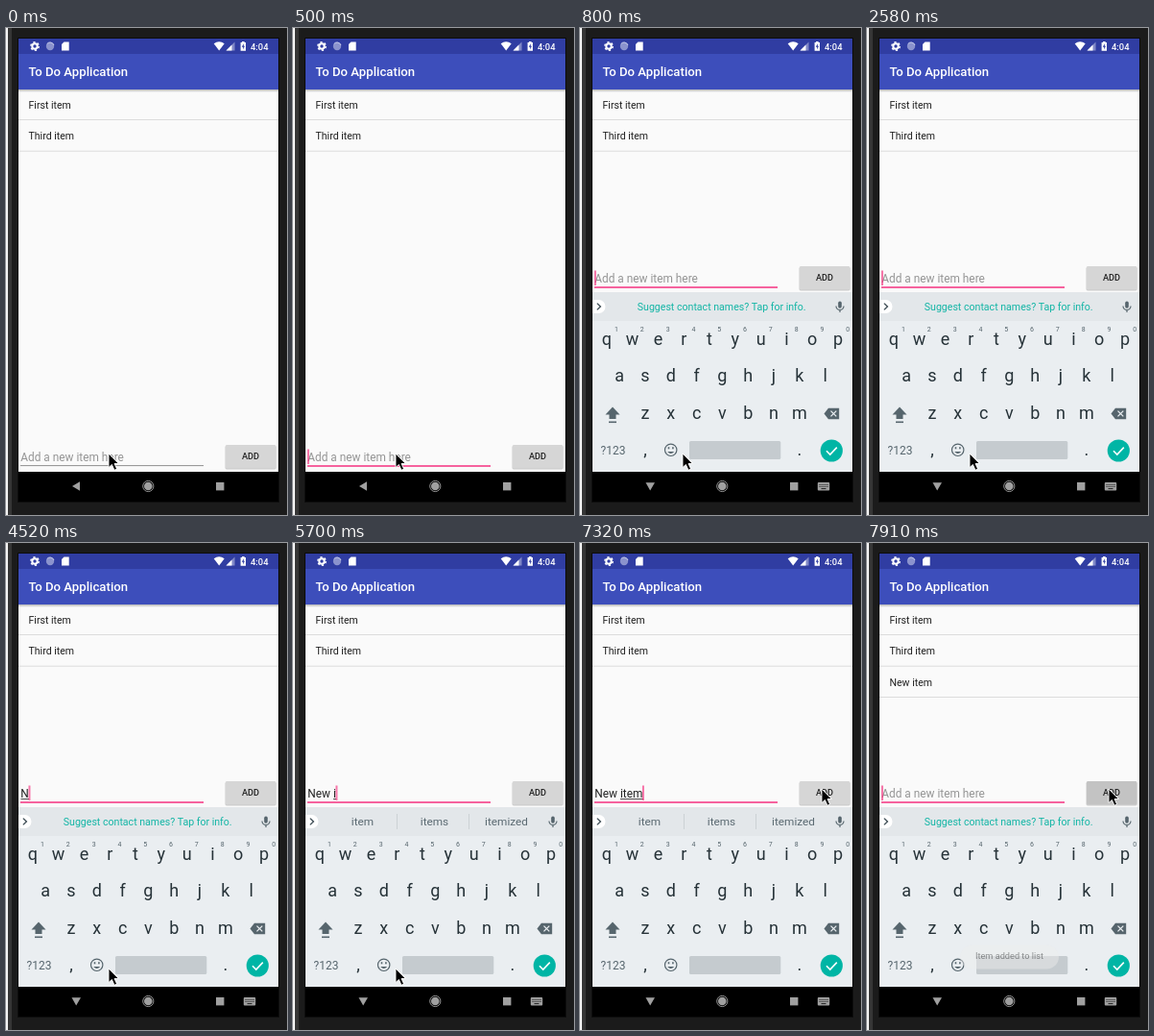
An HTML page that plays this animation: 293x507 px, repeating every 8000 ms.

```html
<!DOCTYPE html>
<html lang="en">
<head>
<meta charset="utf-8">
<title>To Do Application</title>
<style>
html, body { margin: 0; width: 100%; height: 100%; overflow: hidden; background: #1b1b1b; }
svg { display: block; width: 100%; height: 100%; font-family: Roboto, sans-serif; }
.anim { animation: 8s step-end infinite; }
.mid { text-anchor: middle; }
.medium { font-weight: 500; }

#row { animation-name: row; }
@keyframes row { 0% { transform: none; } 8.125%, 100% { transform: translateY(-186px); } }

#idle { animation-name: idle; }
@keyframes idle { 0% { opacity: 1; } 6.25%, 100% { opacity: 0; } }
#focus { animation-name: focus; }
@keyframes focus { 0% { opacity: 0; } 6.25%, 100% { opacity: 1; } }

#hint { animation-name: hint; }
@keyframes hint { 0% { opacity: 1; } 56.5% { opacity: 0; } 97%, 100% { opacity: 1; } }

#typed { animation-name: typed; }
@keyframes typed {
  0% { width: 0; } 56.5% { width: 9px; } 62% { width: 15.3px; } 63.875% { width: 24.3px; }
  67.5% { width: 27px; } 71.25% { width: 30px; } 73.125% { width: 33.9px; }
  75% { width: 40.2px; } 76.625% { width: 51px; } 97%, 100% { width: 0; }
}
#caretX { animation-name: caretX; }
@keyframes caretX {
  0% { transform: none; } 56.5% { transform: translateX(8.5px); } 62% { transform: translateX(14.8px); }
  63.875% { transform: translateX(23.7px); } 67.5% { transform: translateX(26.6px); }
  71.25% { transform: translateX(29.5px); } 73.125% { transform: translateX(33.4px); }
  75% { transform: translateX(39.7px); } 76.625% { transform: translateX(50px); }
  97%, 100% { transform: none; }
}
#caret { animation-name: blink; }
@keyframes blink {
  0% { opacity: 0; } 6.25% { opacity: 1; } 13.75% { opacity: 0; } 19.25% { opacity: 1; }
  24.875% { opacity: 0; } 32.25% { opacity: 1; } 37.875% { opacity: 0; } 43.375% { opacity: 1; }
  50.875% { opacity: 0; } 56.5% { opacity: 1; } 84.125% { opacity: 0; } 89.75%, 100% { opacity: 1; }
}
#firstWord { animation-name: firstWord; }
@keyframes firstWord { 0% { opacity: 1; } 67.5%, 100% { opacity: 0; } }

#press { animation-name: press; }
@keyframes press { 0% { fill: #d6d6d6; } 95.125%, 100% { fill: #c3c3c3; } }
#added { animation-name: added; }
@keyframes added { 0% { opacity: 0; } 97%, 100% { opacity: 1; } }
#toast { animation-name: toast; }
@keyframes toast { 0% { opacity: 0; } 98.875%, 100% { opacity: .45; } }

#keyboard { animation-name: keyboard; }
@keyframes keyboard {
  0% { opacity: 0; transform: none; } 8.125% { opacity: .68; transform: translateY(18px); }
  10%, 100% { opacity: 1; transform: none; }
}
#tip { animation-name: tip; }
@keyframes tip { 0% { opacity: 1; } 67.5% { opacity: 0; } 97%, 100% { opacity: 1; } }
#words { animation-name: words; }
@keyframes words { 0% { opacity: 0; } 71.25% { opacity: 1; } 97%, 100% { opacity: 0; } }

#navBack { animation-name: navBack; }
@keyframes navBack { 0% { opacity: 1; } 8.125%, 100% { opacity: 0; } }
#navHide { animation-name: navHide; }
@keyframes navHide { 0% { opacity: 0; } 8.125%, 100% { opacity: 1; } }

#mouse { animation-name: mouse; }
@keyframes mouse {
  0% { transform: translate(107px, 443px); } 82.25% { transform: translate(115.5px, 438px); }
  84.125% { transform: translate(152px, 404px); } 86% { transform: translate(200px, 345px); }
  87.875% { transform: translate(241px, 286px); } 89.75% { transform: translate(262px, 260px); }
  91.5%, 100% { transform: translate(252px, 256px); }
}
</style>
</head>
<body>
<svg viewBox="0 0 293 507" preserveAspectRatio="none">
  <defs>
    <linearGradient id="shade" x2="0" y2="1">
      <stop stop-color="#000" stop-opacity=".28"/><stop offset="1" stop-color="#000" stop-opacity="0"/>
    </linearGradient>
    <clipPath id="typedClip"><rect id="typed" class="anim" x="15" y="246" width="0" height="220"/></clipPath>
  </defs>

  <!-- device -->
  <rect width="293" height="507" fill="#1b1b1b"/>
  <rect width="2" height="507" fill="#f4f4f4"/>
  <rect x="2" width="4" height="507" fill="#353535"/>
  <rect x="12" y="10" width="273" height="484" fill="#0c0c0c"/>
  <rect x="13" y="11" width="271" height="451" fill="#fafafa"/>
  <rect x="13" y="462" width="271" height="31"/>

  <!-- bars -->
  <rect x="13" y="64" width="271" height="3" fill="url(#shade)"/>
  <rect x="13" y="11" width="271" height="16" fill="#303da2"/>
  <rect x="13" y="27" width="271" height="37" fill="#3d4ebb"/>
  <text class="medium" x="23.5" y="50.3" font-size="13.2" fill="#fff">To Do Application</text>
  <g fill="#fff">
    <circle cx="30" cy="19" r="2.7" fill="none" stroke="#fff" stroke-width="2"/>
    <circle cx="30" cy="19" r="4.2" fill="none" stroke="#fff" stroke-width="1.5" stroke-dasharray="2.2"/>
    <circle cx="46" cy="19" r="4.2" fill="#8b93cd"/>
    <path d="M42.8 16.5A4.2 4.2 0 0 1 50 18" fill="none" stroke="#c5cae9"/>
    <path d="M60.5 14.5H65.7V23.5H58V17Z"/>
    <path d="M216.7 16.2Q222.2 12.5 227.7 16.2L222.2 23.4Z"/>
    <path d="M238.5 14.5V23.5H229.5Z" opacity=".4"/>
    <path d="M235.5 17.5V23.5H229.5Z"/>
    <path d="M246 14H248.6V15H250V23.8H244.6V15H246Z"/>
    <path d="M247.8 16.2L245.8 19.8H247.2V22.5L249 18.8H247.8Z" fill="#303da2"/>
    <text class="medium" x="255" y="22.6" font-size="9.4">4:04</text>
  </g>

  <!-- list -->
  <g font-size="10.55" fill="#212121">
    <text x="23.5" y="83.6">First item</text>
    <text x="23.5" y="116.1">Third item</text>
    <path d="M13 95.5H284M13 128.2H284" stroke="#dcdcdc"/>
    <g id="added" class="anim">
      <text x="23.5" y="148.6">New item</text>
      <path d="M13 160.5H284" stroke="#dcdcdc"/>
    </g>
  </g>

  <!-- entry row -->
  <g id="row" class="anim">
    <text id="hint" class="anim" x="15.3" y="451" font-size="11.86" fill="#959595">Add a new item here</text>
    <path id="idle" class="anim" d="M15 455.6H206" stroke="#858585" stroke-width=".9"/>
    <path id="focus" class="anim" d="M15 456H206" stroke="#f5317f" stroke-width="1.6"/>
    <g clip-path="url(#typedClip)">
      <text x="15.3" y="451" font-size="11.86" fill="#212121">New item</text>
      <path id="firstWord" class="anim" d="M15.5 452.6H39.3" stroke="#333" stroke-width=".9"/>
      <path d="M42 452.6H66" stroke="#333" stroke-width=".9"/>
    </g>
    <g id="caretX" class="anim"><rect id="caret" class="anim" x="15.3" y="438.5" width="1.3" height="15.5" fill="#f5317f"/></g>
    <rect x="228.5" y="434.8" width="53.2" height="24.6" rx="1.6" opacity=".18"/>
    <rect id="press" class="anim" x="229" y="434" width="52.3" height="24.3" rx="1.3" fill="#d6d6d6"/>
    <text class="mid medium" x="255" y="449.2" font-size="9.2" fill="#212121">ADD</text>
  </g>

  <!-- keyboard -->
  <g id="keyboard" class="anim">
    <rect x="13" y="275" width="271" height="187" fill="#eaeef1"/>
    <rect x="13" y="275" width="271" height="30" fill="#e3e7ea"/>
    <path d="M13 283H19.5A7 7 0 0 1 19.5 297H13Z" fill="#fff"/>
    <path d="M17.8 286.6L21.4 290L17.8 293.4" fill="none" stroke="#37474f" stroke-width="1.3"/>
    <text id="tip" class="anim mid" x="147.7" y="293.8" font-size="10.6" fill="#12b5a5">Suggest contact names? Tap for info.</text>
    <g id="words" class="anim mid" font-size="11.8" fill="#5b6a72">
      <text x="72.5" y="294.2">item</text><text x="147.5" y="294.2">items</text><text x="222.5" y="294.2">itemized</text>
      <path d="M108.5 282V298M183.5 282V298" stroke="#ccd2d5"/>
    </g>
    <g fill="none" stroke="#56656d" stroke-width="1.2">
      <rect x="269.2" y="284.5" width="3.6" height="7.2" rx="1.8" fill="#56656d" stroke="none"/>
      <path d="M267 289.5A4 4 0 0 0 275 289.5M271 293.5V296"/>
    </g>
    <g id="keys" class="mid" fill="#263238"></g>
    <path d="M34 394.5L41.5 402.5H37.5V407H30.5V402.5H26.5Z" fill="#56656d"/>
    <path d="M30 410.3H38" stroke="#56656d" stroke-width="1.6"/>
    <path d="M254.5 401.5L259 395.8H270.2V407.2H259Z" fill="#56656d"/>
    <path d="M261.5 398.6L267.3 404.4M267.3 398.6L261.5 404.4" stroke="#eaeef1" stroke-width="1.3"/>
    <text class="mid" x="34.5" y="443.8" font-size="12" fill="#56656d">?123</text>
    <g fill="none" stroke="#56656d" stroke-width="1.2">
      <circle cx="94.7" cy="439.3" r="6.2"/>
      <path d="M91.2 441Q94.7 445.2 98.2 441Z" fill="#56656d" stroke="none"/>
      <path d="M92.5 436.3V438.3M96.9 436.3V438.3" stroke-width="1.6"/>
    </g>
    <rect x="114" y="430" width="95.3" height="19" rx="1.6" fill="#c5cbcf"/>
    <circle cx="262.3" cy="440" r="11.6" fill="#00b5a5"/>
    <path d="M257 440.3L260.8 444L267.8 436.6" fill="none" stroke="#fff" stroke-width="1.6"/>
  </g>

  <g id="toast" class="anim">
    <rect x="97" y="418.5" width="103" height="25" rx="12.5" fill="#ececec"/>
    <text class="mid" x="148.5" y="433.2" font-size="9.2" fill="#222">Item added to list</text>
  </g>

  <!-- navigation -->
  <g fill="#a0a0a0">
    <path id="navBack" class="anim" d="M77 472.3V481.7L69 477Z"/>
    <g id="navHide" class="anim">
      <path d="M68.5 473.2H78L73.2 481.4Z"/>
      <rect x="247.8" y="473" width="12.4" height="8.4" rx="1"/>
      <path d="M249.5 475.4H258.7M249.5 477.4H258.7" stroke="#111" stroke-width=".9" stroke-dasharray="1.1 .9"/>
      <path d="M251.5 479.6H256.5" stroke="#111" stroke-width=".9"/>
    </g>
    <circle cx="148.3" cy="477" r="4.3"/>
    <circle cx="148.3" cy="477" r="5.6" fill="none" stroke="#a0a0a0" stroke-width=".9"/>
    <rect x="219" y="473" width="8.4" height="8.4"/>
  </g>

  <path id="mouse" class="anim" d="M0 0V14.5L3.4 11.5L6 17.3L8.6 16.1L6.1 10.5H10.5Z" stroke="#fff" stroke-width=".9"/>
</svg>
<script>
const keys = document.getElementById('keys');

function label(str, x, y, size, fill) {
  const el = document.createElementNS('http://www.w3.org/2000/svg', 'text');
  Object.entries({ x, y, 'font-size': size, ...(fill && { fill }) })
    .forEach(([name, value]) => el.setAttribute(name, value));
  el.textContent = str;
  keys.append(el);
}

function keyRow(letters, x, y) {
  [...letters].forEach((c, i) => label(c, x + i * 26.8, y, 18));
}

keyRow('qwertyuiop', 27.8, 329.8);
keyRow('asdfghjkl', 41.2, 368.3);
keyRow('zxcvbnm', 68, 407.2);
label(',', 68, 444.5, 18);
label('.', 228.8, 444.5, 18);
[...'1234567890'].forEach((d, i) => label(d, 38 + i * 26.8, 315.8, 7, '#56656d'));
</script>
</body>
</html>
```
